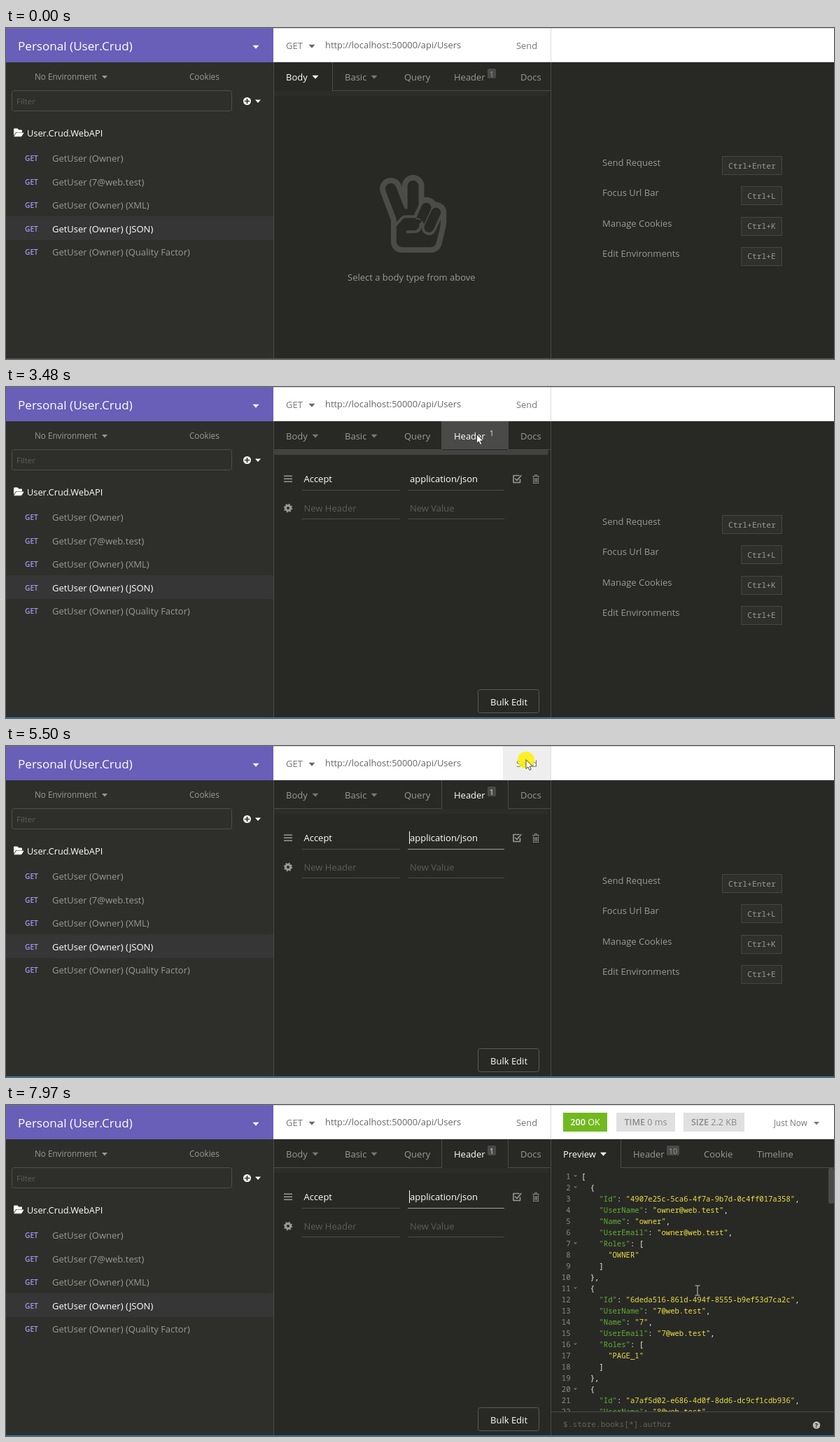
An HTML page that plays this animation: 1183 px wide and 473 px high, repeating every 8 s.

```html
<!DOCTYPE html>
<html lang="en">
<head>
<meta charset="utf-8">
<title>REST client</title>
<style>
  html, body { margin: 0; width: 100%; height: 100%; overflow: hidden; background: #282925; }
  svg { display: block; }
  text { font-family: "Open Sans", "Noto Sans", sans-serif; white-space: pre; }
  .mono { font-family: "Noto Sans Mono", "DejaVu Sans Mono", monospace; }
</style>
</head>
<body>
<svg id="stage" width="1183" height="473" viewBox="0 0 1183 473"></svg>
<script>
const LOOP = 8000;
const GREY = '#999', DIM = '#5c5d59', LINE = '#4b4c48', WHITE = '#fff';

// Markup helpers
const text = (x, y, s, fill = GREY, size = 13, extra = '') =>
  `<text x="${x}" y="${y}" fill="${fill}" font-size="${size}" ${extra}>${s}</text>`;
const mono = (x, y, s, fill, size, extra = '') => text(x, y, s, fill, size, `class="mono" ${extra}`);
const rect = (x, y, w, h, fill, extra = '') =>
  `<rect x="${x}" y="${y}" width="${w}" height="${h}" fill="${fill}" ${extra}/>`;
const frame = (x, y, w, h, stroke, r = 3, fill = 'none') =>
  rect(x + .5, y + .5, w - 1, h - 1, fill, `stroke="${stroke}" rx="${r}"`);
const path = (d, stroke, width = 1, fill = 'none') =>
  `<path d="${d}" fill="${fill}" stroke="${stroke}" stroke-width="${width}" stroke-linecap="round" stroke-linejoin="round"/>`;
const caret = (x, y, fill, r = 4.5) =>
  `<path d="M${x - r} ${y - r / 2}h${2 * r}l${-r} ${r * 1.1}z" fill="${fill}"/>`;
const group = (id, ...parts) => `<g id="${id}">${parts.join('')}</g>`;
const badge = (x, w, n, fill) =>
  rect(x, 58, w, 14, '#4a4b48', 'rx="2"') + text(x + w / 2, 69.5, n, fill, 11, 'text-anchor="middle"');

function sidebar() {
  const requests = ['(Owner)', '(7@web.test)', '(Owner) (XML)', '(Owner) (JSON)', '(Owner) (Quality Factor)'];
  return rect(0, 49, 382, 424, '#2e2f2b') + rect(0, 0, 382, 49, '#695eb8') +
    text(17, 32, 'Personal (User.Crud)', WHITE, 17.1) + caret(357, 27, WHITE) +
    text(41, 74, 'No Environment', GREY, 11.7) + caret(141, 70, GREY, 4) +
    text(262, 74, 'Cookies', GREY, 11.7) +
    frame(8, 89, 315, 30, '#4f504c') + text(15, 109, 'Filter', DIM, 11.5) +
    `<circle cx="344.5" cy="104.5" r="5.5" fill="#fff"/>` +
    path('M341.5 104.5h6M344.5 101.5v6', '#2e2f2b', 1.7) + caret(360, 104.5, WHITE, 4) +
    path('M11.5 152v-8h5l1.5 2h4.5v2.5h-8z', WHITE, 1, WHITE) + path('M12 154.5l3-4.5h10l-3 4.5z', WHITE, 1, WHITE) +
    text(30, 154.5, 'User.Crud.WebAPI', WHITE, 12.8) +
    rect(0, 269, 382, 34, '#363636') +
    requests.map((name, i) => {
      const y = 191 + i * 33.5;
      return text(27, y - 1, 'GET', '#a596ee', 10.2, 'font-weight="600"') +
        text(66, y, 'GetUser ' + name, i === 3 ? WHITE : GREY);
    }).join('');
}

const tabLabels = headerActive =>
  text(400, 74.5, 'Body', headerActive ? GREY : WHITE) + caret(442, 70, headerActive ? '#777' : WHITE) +
  text(484, 74.5, 'Basic') + caret(526, 70, '#777') + text(569, 74.5, 'Query') +
  text(640, 74.5, 'Header', headerActive ? WHITE : GREY) + badge(688, 12, 1, headerActive ? '#ddd' : GREY) +
  text(735, 74.5, 'Docs');

// Peace sign: a solid silhouette with cut-outs for fingers and palm
const silhouette = 'M1288 627Q1348 627 1395 650Q1536 713 1536 876V1053Q1536 1147 1513 1239L1428 1595' +
  'Q1408 1680 1337 1736T1178 1792H512Q406 1792 331 1717T256 1536V1039L17 412Q0 367 0 320A256 256 0 0 1 495 229' +
  'L512 273V256A256 256 0 0 1 1024 256V517Q1051 512 1072 512Q1141 512 1199 543T1288 627Z';
const ringFinger = 'M1072 640q-33 0-60 18t-42 48l-145 318h55q50 0 90 31t50 81l154-338q10-20 10-46A112 112 0 0 0 1072 640Z';
const pinky = 'M1293 755q-70 0-110 84l-149 327q-10 20-10 46a112 112 0 0 0 112 112q70 0 102-66l160-352q9-18 9-38A113 113 0 0 0 1293 755Z';
const twoFingers = 'M128 320q0 22 8 46l248 650v69l102-111q43-46 104-46h198L896 692V256a128 128 0 0 0-256 0V784H576' +
  'L376 275A128 128 0 0 0 128 320Z';
const palm = 'M384 1180L533 1017Q556 992 590 992H880Q960 1000 960 1088Q950 1290 1030 1350Q1090 1395 1150 1388' +
  'Q1240 1380 1285 1290L1404 1030V1053Q1404 1130 1389 1208L1303 1564Q1292 1608 1257 1636T1178 1664H512' +
  'A128 128 0 0 1 384 1536Z';
const hand = `<g transform="translate(534 210) scale(.062)">
  <path fill="${LINE}" fill-rule="evenodd" d="${silhouette + ringFinger + pinky + twoFingers + palm}"/>
  ${path('M640 1312H800Q944 1300 944 1130', LINE, 64)}</g>`;

const trash = path('M752.5 127.5h9M755.5 127v-1.5h3v1.5M753.5 129v8.5h7v-8.5M755.5 130.5v5M757 130.5v5M758.5 130.5v5', '#888', 1);
const gear = `<circle cx="403" cy="173" r="3.5" fill="none" stroke="#999" stroke-width="3"/>
  <circle cx="403" cy="173" r="5.2" fill="none" stroke="#999" stroke-width="2" stroke-dasharray="2.04"/>`;

const headerPane = () =>
  [0, 1, 2].map(i => rect(397, 126.5 + i * 4, 12, 1.5, GREY)).join('') +
  text(425.5, 136, 'Accept', WHITE) + text(577, 136, 'application/json', WHITE) +
  [[423, 147], [574, 147], [423, 188], [574, 188]].map(([x, y]) => rect(x, y, x < 500 ? 140 : 138, 1, LINE)).join('') +
  path('M734.5 132v4.5h-9.5v-10h8M727.5 131l2.5 2.5 6-7', GREY, 1.6) + trash + gear +
  text(425.5, 178, 'New Header', DIM) + text(577, 178, 'New Value', DIM) +
  frame(674, 432, 88, 34, '#5a5b57') + text(692, 454.5, 'Bulk Edit', WHITE);

function shortcuts() {
  return [['Send Request', 'Ctrl+Enter'], ['Focus Url Bar', 'Ctrl+L'], ['Manage Cookies', 'Ctrl+K'], ['Edit Environments', 'Ctrl+E']]
    .map(([label, keys], i) => {
      const y = 183 + i * 43.3, w = 18 + keys.length * 6.8;
      return text(852, y + 14, label) + frame(1109 - w, Math.round(y), w, 27, '#454642', 0, '#2f302c') +
        mono(1109 - w + 9, y + 17.5, keys, GREY, 11.3);
    }).join('');
}

const user = (id, mail, name, role) => [
  '  {', `    "Id": "${id}",`, `    "UserName": "${mail}",`, `    "Name": "${name}",`,
  `    "UserEmail": "${mail}",`, '    "Roles": [', `      "${role}"`, '    ]', '  },'];
const code = ['[',
  ...user('4907e25c-5ca6-4f7a-9b7d-0c4ff017a358', 'owner@web.test', 'owner', 'OWNER'),
  ...user('6deda516-861d-494f-8555-b9ef53d7ca2c', '7@web.test', '7', 'PAGE_1'),
  ...user('a7af5d02-e686-4d0f-8dd6-dc9cf1cdb936', '8@web.test', '8', 'PAGE_2')].slice(0, 22);

const colorize = line => line.trim().replace(/("[^"]*")(:?)/g, (_, s, colon) =>
  `<tspan fill='${colon ? '#62ae36' : '#ebdf45'}'>${s}</tspan>${colon}`);

function response() {
  const chip = (x, w, bold, rest, fill, ink) => rect(x, 11, w, 27, fill) +
    text(x + w / 2, 29.3, `<tspan font-weight="600">${bold}</tspan> ${rest}`, ink, 12.6, 'text-anchor="middle"');
  const lines = code.map((line, i) => {
    const y = 105.7 + i * 16.02;
    return mono(806.5, y, i + 1, '#8a8b87', 10.6, 'text-anchor="end"') +
      mono(822 + line.search(/\S/) * 6.36, y, colorize(line), '#f4f4f0', 10.6, 'font-weight="500"');
  }).join('');
  const folds = code.map((line, i) => /[\[{]$/.test(line) ? caret(813.5, 101.5 + i * 16.02, '#6b6c68', 2.6) : '').join('');
  return chip(796, 63, '200', 'OK', '#72b920', WHITE) + chip(872, 84, 'TIME', '0 ms', '#e0e0e0', '#888') +
    chip(968, 87, 'SIZE', '2.2 KB', '#e0e0e0', '#888') +
    text(1097, 30, 'Just Now', '#777', 11.7) + caret(1158, 26, '#777', 4) +
    rect(878, 49, 1, 41, LINE) + rect(878, 89, 305, 1, LINE) +
    text(796, 74.5, 'Preview', WHITE) + caret(853.5, 70, WHITE) +
    text(896, 74.5, 'Header') + badge(944, 18, 10, GREY) + text(997, 74.5, 'Cookie') + text(1073, 74.5, 'Timeline') +
    `<g clip-path="url(#codeArea)">${lines}${group('folds', folds)}</g>` +
    rect(1175, 90, 8, 51, '#4a4b48', 'rx="3"') + rect(779, 438, 404, 1, LINE) +
    mono(796, 460, '$.store.books[*].author', '#62635f', 11.2) +
    `<circle cx="1158" cy="457.5" r="5.3" fill="#bbb"/>` +
    text(1158, 461, '?', '#282925', 9, 'font-weight="700" text-anchor="middle"');
}

const stage = document.getElementById('stage');
stage.innerHTML = `<clipPath id="codeArea"><rect x="779" y="90" width="404" height="348"/></clipPath>` +
  rect(0, 0, 1183, 473, '#282925') + sidebar() + rect(382, 0, 801, 49, WHITE) +
  group('sendHover', rect(710, 0, 68, 49, '#eeeeee')) +
  rect(382, 48, 801, 1, '#d8d8d8') + rect(778, 0, 1, 49, '#ddd') +
  text(400, 30, 'GET', '#777') + caret(437, 26, '#666') +
  text(456, 28.5, 'http://localhost:50000/api/Users', '#666', 12.9) + text(729, 30, 'Send', '#777', 12.9) +
  rect(383, 90, 392, 7, '#2c2d29') +
  group('bodyView', rect(466, 49, 1, 41, LINE), rect(466, 89, 312, 1, LINE), tabLabels(false), hand,
    text(488, 360.5, 'Select a body type from above')) +
  group('headerView', group('tabHover', rect(622, 49, 96, 40, '#4a4b48')),
    rect(383, 89, 240, 1, LINE), rect(717, 89, 61, 1, LINE), rect(622, 49, 1, 41, LINE), rect(717, 49, 1, 41, LINE),
    tabLabels(true), headerPane()) +
  group('focusLine', rect(574, 147, 138, 1, '#a0a19d')) + group('textCaret', rect(576, 122, 1, 18, WHITE)) +
  group('scrollbar', rect(383, 90, 392, 7, '#424340', 'rx="3.5"')) +
  group('shortcuts', shortcuts()) + group('response', response()) +
  rect(382, 49, 1, 424, LINE) + rect(778, 49, 1, 424, LINE) +
  rect(0, 0, 1183, 1, '#888', 'opacity=".35"') + rect(0, 472, 1183, 1, '#555', 'id="bottomEdge"') +
  group('pointer', `<circle id="halo" r="12" fill="#fff000"/>`,
    group('arrow', path('M0 0V12.5L2.9 9.8L5 14.5L7.2 13.5L5.2 9H9Z', '#222', .8, WHITE)),
    group('beam', path('M-3 -7H-1Q0 -7 0 -6Q0 -7 1 -7H3M0 -6V6M-3 7H-1Q0 7 0 6Q0 7 1 7H3', '#c8c8c4', 1)));

const el = id => document.getElementById(id);
const show = (id, on) => el(id).style.display = on ? '' : 'none';
const within = (v, from, to) => v >= from && v < to;

// Pointer moves: start, end, number of positions, destination
const moves = [
  [680, 910, 4, 782, 175], [1140, 1920, 11, 673, 78], [2000, 2150, 3, 673, 75], [2320, 2470, 3, 672, 66],
  [3480, 4100, 9, 689, 123], [4400, 5030, 9, 670, 131], [5110, 5500, 6, 743, 20],
  [6340, 6420, 2, 744, 18], [6590, 6890, 2, 746, 17], [7060, 7740, 10, 1036, 386],
  [7740, 7820, 2, 1032, 373], [7890, 7970, 2, 988, 265]];
// Click halos: start, end, opacity
const clicks = [[2930, 3170, .6], [4250, 4560, .5], [5420, 6040, .85]];

function pointerAt(t) {
  let x = 1027, y = 427;
  for (const [start, end, count, toX, toY] of moves) {
    if (t < start) break;
    const step = Math.min(count, 1 + Math.floor((t - start) / (end - start) * (count - 1) + 1e-6));
    const f = step / count, k = f * f * (3 - 2 * f);
    x += (toX - x) * k;
    y += (toY - y) * k;
  }
  return { x, y };
}

function draw(t) {
  const { x, y } = pointerAt(t);
  const header = t >= 3010, loaded = t >= 6110, moving = t >= 680;
  const overTabs = moving && within(x, 383, 778) && within(y, 49, 97);
  const overText = header && within(x, 574, 712) && within(y, 112, 148) || loaded && x > 779 && y > 90;
  const click = clicks.find(c => within(t, c[0], c[1]));

  show('bodyView', !header);
  show('headerView', header);
  show('shortcuts', !loaded);
  show('response', loaded);
  show('folds', t >= 6590);
  show('scrollbar', overTabs);
  show('tabHover', overTabs && within(x, 622, 718) && y < 89);
  show('sendHover', within(x, 710, 778) && y < 49);
  show('focusLine', t >= 4250);
  show('textCaret', within(t, 4250, 4980) || within(t, 5500, 6040) || within(t, 6590, 7120) || t >= 7650);
  el('bottomEdge').setAttribute('fill', t < 2930 ? '#555' : '#1883c4');

  show('pointer', moving);
  show('arrow', !overText);
  show('beam', overText);
  el('pointer').setAttribute('transform', `translate(${x.toFixed(1)} ${y.toFixed(1)})`);
  el('halo').setAttribute('opacity', click ? click[2] : 0);
}

const begin = performance.now();
function tick() {
  draw((performance.now() - begin) % LOOP);
  requestAnimationFrame(tick);
}
tick();
</script>
</body>
</html>
```
